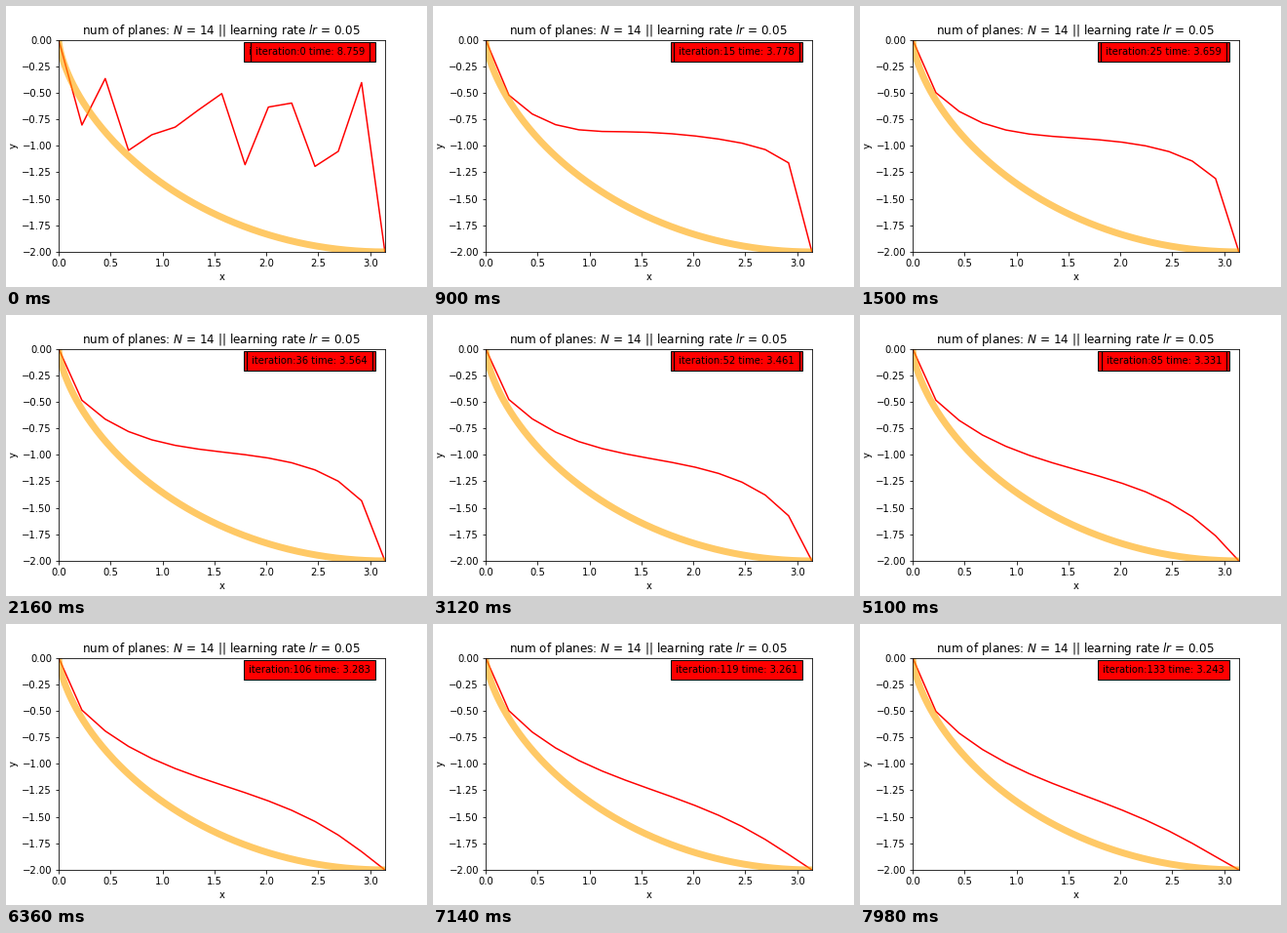
Recreate the animation shown at these times as a matplotlib script. Size 432x288 px, loop 8 s.

```python
import numpy as np
import matplotlib.pyplot as plt
from matplotlib.animation import FuncAnimation

PLANES = 14
RATE = 0.05
STEP_MS = 60
TICK_MS = 20
LOOP_MS = 8000
STEPS = -(-LOOP_MS // STEP_MS)
START_TIME = 8.759
START_DEPTH = [0, 0.804, 0.366, 1.043, 0.896, 0.824, 0.662, 0.508,
               1.178, 0.635, 0.597, 1.194, 1.052, 0.404, 2]

x = np.linspace(0, np.pi, PLANES + 1)
dx = x[1]


def descent(h):
    """Sliding time down the planes (g = 1) and its gradient at inner nodes."""
    v = np.sqrt(2 * h)
    dh = np.diff(h)
    length = np.hypot(dx, dh)
    speed = v[:-1] + v[1:]
    t = 2 * length / speed
    slope = 2 * dh / (length * speed)
    drag = t / speed
    grad = slope[:-1] - slope[1:] - (drag[:-1] + drag[1:]) / v[1:-1]
    return t.sum(), grad


def optimise():
    """Each step pairs a curve with the time measured before its update."""
    h = np.array(START_DEPTH, float)
    curves, times = [-h], [START_TIME]
    for _ in range(STEPS - 1):
        t, grad = descent(h)
        h[1:-1] = np.maximum(h[1:-1] - RATE * grad, 0.01)
        curves.append(-h)
        times.append(t)
    return curves, times


def caption(step):
    return f"iteration:{step} time: {times[step]:.3f}"


def badge(text):
    return ax.text(0.77, 0.93, text, transform=ax.transAxes, ha="center",
                   bbox={"facecolor": "red", "pad": 5})


curves, times = optimise()

plt.rcParams.update({"font.family": "DejaVu Sans", "font.size": 10})
fig = plt.figure(figsize=(6, 4), dpi=72, facecolor="white")
fig.subplots_adjust(left=0.125, right=0.9, bottom=0.125, top=0.88)
ax = fig.add_subplot()
ax.set(xlim=(0, np.pi), ylim=(-2, 0), xlabel="x", ylabel="y")
ax.set_title(f"num of planes: $N$ = {PLANES} || learning rate $lr$ = {RATE}",
             fontsize=12)

line, = ax.plot(x, curves[0], color="red", lw=1.5)
theta = np.linspace(0, np.pi, 200)
ax.plot(theta - np.sin(theta), np.cos(theta) - 1,
        color="orange", lw=7, alpha=0.6)

badge(caption(STEPS - 1))
label = badge(caption(0))


def update(tick):
    step = tick * TICK_MS // STEP_MS
    line.set_ydata(curves[step])
    label.set_text(caption(step))
    return line, label


anim = FuncAnimation(fig, update, frames=LOOP_MS // TICK_MS, interval=TICK_MS,
                     init_func=lambda: update(0), repeat=True, repeat_delay=0,
                     blit=False)
plt.show()
```
